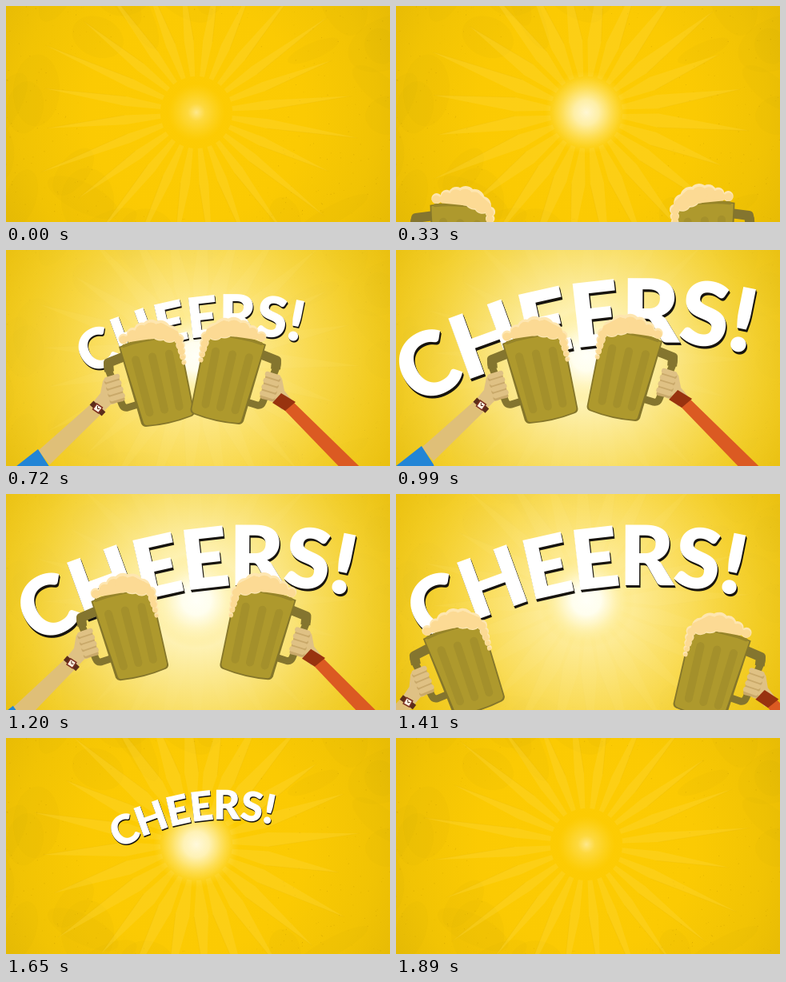
Animation, 480 px wide and 270 px high, one loop 1.92 s. Source, as an HTML page with a canvas:

```html
<!DOCTYPE html>
<html lang="en">
<head>
<meta charset="utf-8">
<title>Cheers</title>
<style>
html, body { margin: 0; width: 100%; height: 100%; overflow: hidden; background: #f6c705; }
canvas { display: block; width: 480px; height: 270px; }
</style>
</head>
<body>
<canvas id="stage" width="480" height="270"></canvas>
<script>
const c = document.getElementById('stage').getContext('2d');
const LOOP = 1920, STEP = 30, TAU = Math.PI * 2, RAD = Math.PI / 180;
const CLASH = 720, PART = 975;

// Progress from 0 to 1 between two times.
const ramp = (t, from, to) => Math.min(1, Math.max(0, (t - from) / (to - from)));
const smooth = u => u * u * (3 - 2 * u);
const backIn = (u, pull) => u * u * ((pull + 1) * u - pull);

let seed = 7;
const rnd = () => (seed = seed * 16807 % 2147483647) / 2147483647;
const blotches = Array.from({ length: 34 }, () => {
  const a = rnd() * TAU, r = 170 + rnd() * 110;
  return [240 + r * Math.cos(a), 135 + r * .7 * Math.sin(a), 15 + rnd() * 40, 10 + rnd() * 25, rnd() * 3];
});
const specks = Array.from({ length: 420 }, () => [rnd() * 480, rnd() * 270, .4 + rnd() * .7])
  .filter(([x, y]) => Math.hypot(x - 220, y - 135) > 130);

// Foam: a row of bubbles, highest right of the middle, then a drip.
const foam = [];
for (let u = 0; u <= 1; u += 1 / 6)
  foam.push([139 + 69 * u, 107 - 12 * Math.sin(Math.PI * u), 6.5 + 6.5 * Math.sin(Math.PI * u ** 1.5)]);
for (let i = 0; i < 4; i++) foam.push([210 + 1.5 * i, 115 + 7 * i, 5.7 - .9 * i]);

function radial(r, ...stops) {
  const g = c.createRadialGradient(238, 133, 0, 238, 133, r);
  stops.forEach(([p, color]) => g.addColorStop(p, color));
  c.fillStyle = g;
  c.fillRect(0, 0, 480, 270);
}
function dot(x, y, r, fill) {
  c.fillStyle = fill;
  c.beginPath();
  c.arc(x, y, r, 0, TAU);
  c.fill();
}
function shape(path, fill) {
  c.fillStyle = fill;
  c.fill(new Path2D(path));
}
function line(path, color, width) {
  c.strokeStyle = color;
  c.lineWidth = width;
  c.stroke(new Path2D(path));
}

function background(t) {
  const lit = smooth(ramp(t, 0, 540)) * (1 - smooth(ramp(t, 1530, 1890)));
  radial(300, [0, '#fdcc03'], [.45, '#fbca03'], [.75, '#f1c304'], [1, '#e3b805']);
  c.fillStyle = 'rgba(190,145,0,.06)';
  for (const [x, y, w, h, a] of blotches) {
    c.beginPath();
    c.ellipse(x, y, w, h, a, 0, TAU);
    c.fill();
  }
  c.fillStyle = 'rgba(150,110,0,.22)';
  for (const [x, y, s] of specks) c.fillRect(x, y, s, s);

  c.save();
  c.translate(238, 133);
  c.rotate((-6 - 15 * t / LOOP) * RAD);
  const half = 6 + 4 * lit;
  for (let i = 0; i < 24; i++) {
    const tip = 195 + 14 * Math.sin(i * 2.4);
    shape(`M45 -3L90 ${-half}L${tip} 0L90 ${half}L45 3Z`, 'rgba(250,214,60,.32)');
    line(`M90 ${half}L${tip} 0`, 'rgba(205,160,0,.1)', 1);
    c.rotate(15 * RAD);
  }
  c.restore();

  c.globalAlpha = smooth(ramp(t, 500, 810)) * (1 - smooth(ramp(t, 1350, 1560)));
  radial(290, [0, '#fff8dc'], [.2, 'rgba(254,243,185,.97)'], [.45, 'rgba(249,228,126,.88)'],
    [.75, 'rgba(243,212,64,.65)'], [1, 'rgba(236,198,30,.4)']);
  c.globalAlpha = 1;

  const k = .5 + .5 * lit, k2 = k * k;
  radial(12 + 48 * k, [0, `rgba(255,255,248,${.1 + .9 * k})`], [.3, `rgba(255,254,238,${k2})`],
    [.5, `rgba(255,249,210,${.75 * k2})`], [.75, `rgba(254,240,160,${.4 * k2})`], [1, 'rgba(253,226,90,0)']);
}

// Letters spaced along a circle by their own widths.
function title(t) {
  const size = .96 * (1 - backIn(1 - ramp(t, 630, 1110), 1.7)) * (1 - backIn(ramp(t, 1410, 1680), 2.2));
  if (size < .01) return;
  const R = 586;
  c.save();
  c.translate(240, 90);
  c.scale(size, size);
  c.translate(75, R - 14);
  c.font = '900 108px Lato, "Open Sans", sans-serif';
  c.textAlign = 'center';
  for (const [drop, color] of [[3.2, '#17140f'], [1.6, '#17140f'], [0, '#fff']]) {
    c.fillStyle = color;
    let arc = -283, last = 0;
    for (const ch of 'CHEERS!') {
      const w = c.measureText(ch).width;
      if (last) arc += (last + w) / 2 + 1.5;
      last = w;
      c.save();
      c.translate(drop / 2, drop);
      c.rotate(arc / R);
      c.fillText(ch, 0, 39 - R);
      c.restore();
    }
  }
  c.restore();
}

function bareArm() {
  shape('M101 186L113 199L47 264L32 247Z', '#dfbf78');
  shape('M0 270L32 245L47 268L54 290L-40 340L-50 310Z', '#2285d6');
}
function watch() {
  line('M99 187L114 201', '#5b2d1b', 7);
  c.save();
  c.translate(106.5, 194);
  c.rotate(35 * RAD);
  c.fillStyle = '#7c2f20';
  c.fillRect(-5, -5, 10, 10);
  c.fillStyle = '#fff3e4';
  c.fillRect(-3.5, -3.5, 7, 7);
  c.restore();
  line('M106.5 191V194.5H109', '#55281c', 1);
}
function sweater() {
  shape('M100 188L111 198L-31 345L-52 336Z', '#db5a22');
}
function cuff() {
  shape('M125 190L114 178L96 189L109 200Z', '#98330f');
}

function hand() {
  const skin = '#dfc184';
  shape('M113 160Q118 152 123 157L133 182Q131 189 123 189L113 199L101 186L110 175Z', skin);
  for (let i = 0; i < 4; i++) {
    const x = 118 + 2.2 * i, y = 158 + 8 * i;
    line(`M${x} ${y + 3}l13 -3`, '#c9a96a', 6);
    line(`M${x} ${y}l13 -4`, skin, 6.5);
  }
}

// Swing up to the clash, spring back a little, then fall away outwards.
function pose(t, reach, lift, lean) {
  const rise = (1 - ramp(t, 180, CLASH)) ** 1.5;
  const touch = 1 - smooth(ramp(t, CLASH, PART));
  const leave = (Math.max(0, t - PART) / 555) ** 2;
  c.translate(183 + 8 * touch - 180 * rise - reach * leave, 160 + lift + 4 * touch + 226 * rise + reach * .62 * leave);
  c.rotate((23 * rise - lean * leave) * RAD);
  c.translate(-183, -160);
}

function mug(arm, wear) {
  c.lineCap = 'butt';
  arm();
  c.lineJoin = 'round';
  line('M142 130L120 137Q118 139 119 143L137 189Q139 194 144 193L157 189', '#84752f', 9);
  line('M140 129L120 137L121 148', '#84752f', 12);
  shape('M133 117Q170 101 208.5 102L227.5 198Q228 202 224 204Q196 215 167 217Q163 217 161 213Z', '#85762a');
  shape('M135 118Q170 103 207 104L225.5 197Q226 201 222 203Q196 213 168 215Q165 215 164 212Z', '#ae992d');
  c.lineCap = 'round';
  for (const u of [.21, .5, .79])
    line(`M${139 + 72 * u} ${136 - 13 * u}L${158 + 64 * u} ${202 - 13 * u}`, '#a4902b', 10);
  line('M139 116Q152 111 164 109T190 103T207 110', '#968429', 4);
  for (const [x, y, r] of foam) dot(x, y, r, '#fee6b0');
  shape('M137 108L152 97L186 87L207 98L214 122L208 117L203 106L194 101L182 106L160 109L147 111Z', '#fcda94');
  for (const [x, y, r] of foam) dot(x - .3, y + 1.3, r * .8, '#fcda94');
  hand();
  c.lineCap = 'butt';
  wear();
}

function draw(now) {
  const t = Math.floor(now % LOOP / STEP) * STEP;
  background(t);
  title(t);
  c.save();
  pose(t, 155, 0, 9);
  mug(bareArm, watch);
  c.restore();
  c.save();
  c.translate(466, 0);
  c.scale(-1, 1);
  pose(t, 178, -3, 3);
  mug(sweater, cuff);
  c.restore();
}

let start;
function tick(now) {
  start ??= now;
  draw(now - start);
  requestAnimationFrame(tick);
}
draw(0);
requestAnimationFrame(tick);
</script>
</body>
</html>
```
